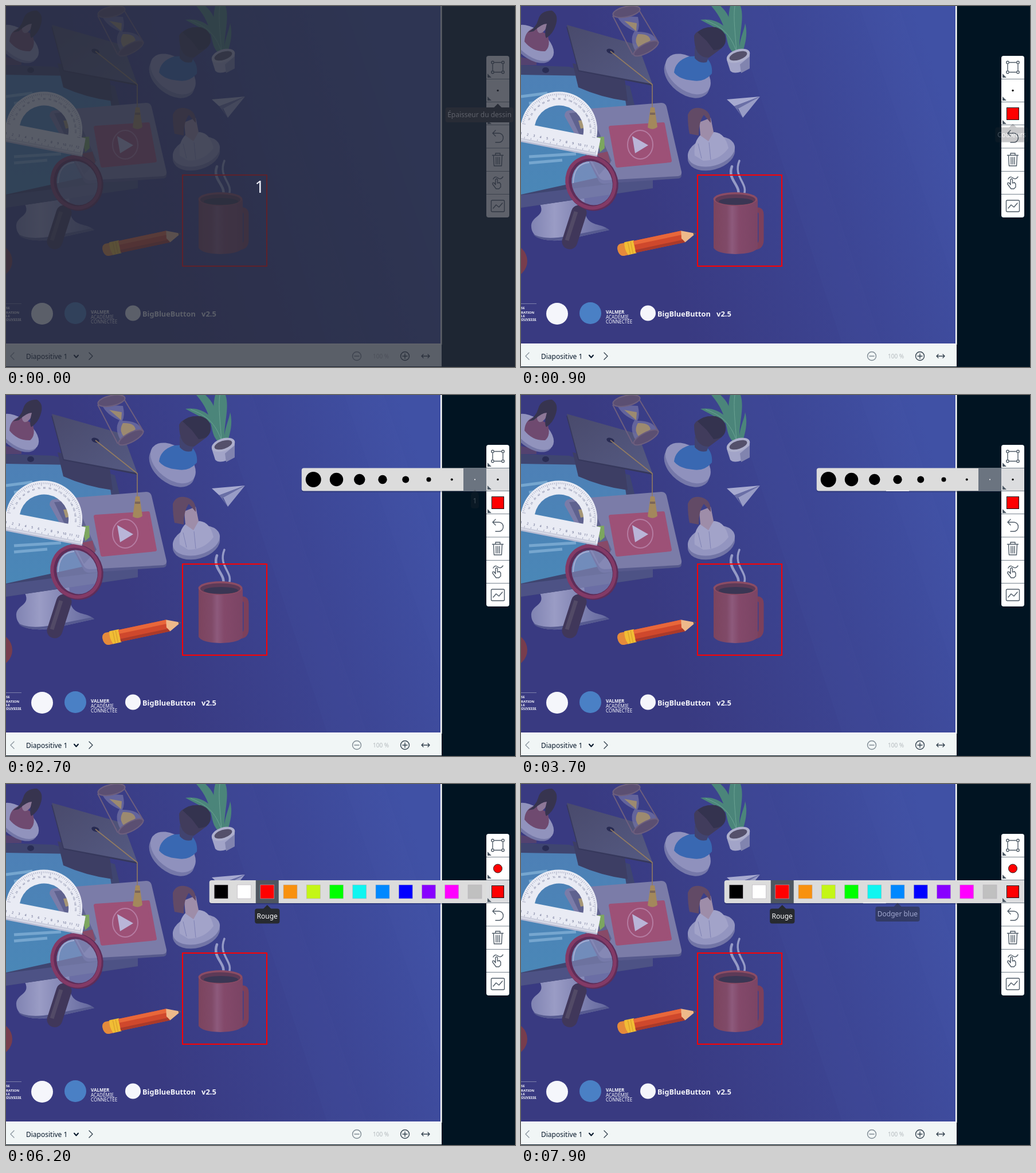
Recreate the animation shown at these times as an HTML page. Size 888 px wide and 630 px high, loop 8000 ms.

```html
<!DOCTYPE html>
<html lang="fr">
<head>
<meta charset="utf-8">
<title>Barre d'outils</title>
<style>
html, body { margin: 0; width: 100%; height: 100%; overflow: hidden; background: #011422; }
svg { display: block; width: 888px; height: 630px; font-family: "Noto Sans", "Open Sans", sans-serif; font-size: 12px; }
.icon { fill: none; stroke: #4e5a66; stroke-width: 1.4; stroke-linecap: round; stroke-linejoin: round; }
.tip text { fill: #fff; text-anchor: middle; }
</style>
</head>
<body>
<svg viewBox="0 0 888 630">
  <defs>
    <linearGradient id="sky" gradientUnits="userSpaceOnUse" x1="230" y1="400" x2="760" y2="225">
      <stop offset="0" stop-color="#393a81"/><stop offset=".5" stop-color="#3c4492"/><stop offset="1" stop-color="#4051a5"/>
    </linearGradient>
    <linearGradient id="mug">
      <stop offset="0" stop-color="#7c445e"/><stop offset=".3" stop-color="#804a68"/><stop offset=".42" stop-color="#8d5a7c"/>
      <stop offset=".58" stop-color="#83496a"/><stop offset="1" stop-color="#7b4464"/>
    </linearGradient>
    <linearGradient id="cap" x2="1" y2="1">
      <stop offset="0" stop-color="#494a6c"/><stop offset="1" stop-color="#555a82"/>
    </linearGradient>
    <linearGradient id="foot">
      <stop offset="0" stop-color="#8083b2"/><stop offset=".3" stop-color="#9a9cc5"/><stop offset="1" stop-color="#62669c"/>
    </linearGradient>
    <linearGradient id="screen" x2="0" y2="1">
      <stop offset="0" stop-color="#4d80b6"/><stop offset="1" stop-color="#4a87b7"/>
    </linearGradient>
    <clipPath id="slide"><path d="M0 0H758V589H0Z"/></clipPath>
  </defs>

  <path fill="#fff" d="M0 0H760.5V591H0Z"/>
  <g clip-path="url(#slide)">
    <path fill="url(#sky)" d="M0 0H758V590H0Z"/>
    <path fill="#5264b5" opacity=".05" d="M430 0L630 590H560L365 0ZM590 0H660L758 290V490Z"/>

    <!-- monitor -->
    <path fill="url(#foot)" d="M33 346C44 368 16 366 18 386C20 412 58 411 82 407L154 391C140 378 118 386 112 362L110 330Z"/>
    <path fill="#565a90" d="M21 398C30 411 60 410 82 407L154 391L150 388L80 402C54 406 36 406 21 398Z"/>
    <path fill="#3f4570" d="M0 103L84 106L190 140L230 303V318L0 352Z"/>
    <path fill="#4d5285" d="M0 330L230 301V318L0 352Z"/>
    <path fill="url(#screen)" d="M0 120L176 123L200 285L0 329Z"/>
    <ellipse cx="43" cy="112" rx="6" ry="5" fill="#292d55"/>
    <g stroke="#76a6cf" stroke-width="5">
      <path d="M0 158L46 152M14 170L40 166M14 263L96 258M14 274L72 269"/>
    </g>
    <path fill="#54426f" d="M0 89L27 95V103H0Z"/>

    <!-- video tablet -->
    <path fill="#56598c" d="M80 196L136 306Q140 311 148 310L275 301Q281 300 280 292L276 280Z"/>
    <path fill="#7b7ca8" d="M84 182L245 169Q252 169 254 176L280 289Q281 296 274 297L146 304Q138 304 135 297L76 192Q76 183 84 182Z"/>
    <path fill="#5f628f" d="M84 187L120 184L158 270L136 295Z"/>
    <path fill="#7ca65f" d="M133 229L145 228L146 248L138 255Z"/>
    <path fill="#a69675" d="M100 200L120 198L126 210L104 214Z"/>
    <path fill="#884a68" d="M132 258L151 254L156 274L145 276Z"/>
    <path fill="#9d5177" stroke="#9d5177" stroke-width="6" stroke-linejoin="round" d="M156 212L248 206L260 270L168 279Z"/>
    <ellipse cx="208" cy="242" rx="22" ry="25" fill="none" stroke="#b57ca2" stroke-width="2"/>
    <path fill="#b9b5d8" d="M194 227L222 243L199 257Z"/>

    <!-- graduation cap -->
    <path fill="#3d3e64" d="M90 100L100 142Q140 160 186 166L180 120Z"/>
    <path fill="#36385c" d="M79 36L100 114L229 139V135Z"/>
    <path fill="url(#cap)" d="M80 33L204 68L229 136L101 112Z"/>
    <ellipse cx="156" cy="79" rx="7" ry="4" fill="#282b52" transform="rotate(18 156 79)"/>
    <path fill="none" stroke="#927b61" stroke-width="1.6" d="M156 79L229 137V180"/>
    <path fill="#a3885c" d="M226 177H233L238 211Q230 218 221 212Z"/>
    <path fill="#7c6659" d="M225 186H234V190H225Z"/>

    <!-- hourglass -->
    <path fill="#7676a6" opacity=".7" d="M167 17L204 19Q208 36 203 45Q232 45 237 61L203 84Q187 60 198 44Q176 35 167 17Z"/>
    <path fill="#9c8a70" d="M180 26L202 30L201 44ZM204 49Q224 48 226 60L206 73Q196 62 204 49Z"/>
    <g fill="#5b4f72" stroke="#6d5f7e" stroke-width="2">
      <ellipse cx="184" cy="10" rx="24" ry="9" transform="rotate(-12 184 10)"/>
      <ellipse cx="218" cy="74" rx="24" ry="8" transform="rotate(-28 218 74)"/>
      <path fill="none" d="M160 17L195 85M207 9L240 64"/>
    </g>

    <!-- plant -->
    <g fill="#4b857a">
      <path d="M371 82C352 66 367 40 332 0H348C374 23 368 55 375 80Z"/>
      <path d="M376 85C375 50 344 42 313 24C336 21 366 30 379 78Z"/>
      <path d="M374 80C361 46 360 20 365 0H383C391 24 378 55 382 80Z"/>
      <path d="M380 84C381 55 389 46 391 30C397 53 389 70 386 86Z"/>
    </g>
    <path stroke="#6ba394" fill="none" d="M376 80C374 50 370 20 373 0M376 80C365 48 350 36 322 25"/>
    <path fill="#a2a4c8" d="M359 94L365 113Q373 122 399 108V80Z"/>
    <path fill="#8184af" d="M382 102L399 88V109L384 117Z"/>
    <ellipse cx="379" cy="87" rx="21" ry="11" fill="#aeb0cd" transform="rotate(-18 379 87)"/>
    <ellipse cx="379" cy="87" rx="16" ry="7" fill="#54506b" transform="rotate(-18 379 87)"/>

    <!-- people on discs -->
    <g transform="rotate(38 22 65)">
      <ellipse cx="21" cy="69" rx="42" ry="24" fill="#7376a6"/>
      <ellipse cx="21" cy="65" rx="42" ry="23" fill="#9193bd"/>
    </g>
    <path fill="#6f4a70" d="M6 62Q7 42 25 38L46 50Q53 70 42 79Q20 80 6 62Z"/>
    <ellipse cx="37" cy="34" rx="8" ry="14" fill="#8d7898" transform="rotate(22 37 34)"/>
    <path fill="#37344f" d="M30 24Q34 8 54 8Q67 16 60 35Q56 48 44 56Q40 50 45 31Q36 31 22 44L12 46Q26 38 30 24Z"/>
    <g transform="rotate(38 291 121)">
      <ellipse cx="292" cy="125" rx="45" ry="29" fill="#7578a9"/>
      <ellipse cx="290" cy="119" rx="45" ry="28" fill="#8f91bd"/>
    </g>
    <path fill="#3968b2" d="M267 116Q269 96 293 88L320 87Q335 99 333 118Q319 134 299 130Q276 128 267 116Z"/>
    <path fill="#41436f" d="M303 72L331 80L324 98Q311 101 303 91Z"/>
    <path fill="#413c5c" d="M302 52Q307 40 328 40L351 73L328 90Q302 91 302 52Z"/>
    <path fill="#34334f" d="M308 46Q318 35 340 37Q359 43 357 62Q354 76 336 77L324 61Z"/>
    <ellipse cx="332" cy="260" rx="42" ry="26" fill="#7275a6" transform="rotate(-15 332 260)"/>
    <ellipse cx="332" cy="254" rx="42" ry="25" fill="#9395c0" transform="rotate(-15 332 254)"/>
    <path fill="#a2a3c9" d="M303 261Q300 234 317 222L338 220Q356 222 362 248Q346 270 318 270Z"/>
    <path fill="#9e8da9" d="M311 203L331 195L336 220L327 236L313 226Z"/>
    <path fill="#624a66" d="M291 190Q297 174 316 179Q332 184 331 204L319 190Q310 202 310 226L294 223Q291 210 291 190Z"/>
    <path fill="none" stroke="#7f82b5" d="M328 238L331 268M309 240L315 266"/>

    <path fill="#a7aad0" d="M359 163L417 158L372 175Z"/>
    <path fill="#6a6fa6" d="M372 175L417 158L378 180L387 195Z"/>
    <path fill="#989cc6" d="M379 179L417 158L387 195Z"/>

    <!-- magnifier -->
    <path stroke="#40375a" stroke-width="27" stroke-linecap="round" d="M101 361L85 411"/>
    <path stroke="#524a66" stroke-width="7" d="M96 359L80 409"/>
    <ellipse cx="124" cy="309" rx="40" ry="44" fill="#8c91be" fill-opacity=".6" stroke="#5e2d59" stroke-width="10" transform="rotate(-24 124 309)"/>
    <ellipse cx="122" cy="308" rx="41" ry="45" fill="none" stroke="#833a66" stroke-width="6" transform="rotate(-24 122 308)"/>
    <path fill="none" stroke="#a5acd3" stroke-width="2" d="M91 309Q92 275 119 273"/>

    <g id="protractor" transform="translate(66 217.5) rotate(11)">
      <path fill="#babdd4" d="M-72 3V32H74V3Z"/>
      <path fill="#e9ebf4" fill-rule="evenodd" d="M-74 29V-1H-67A67 67 0 0 1 67-1H74V29ZM-43-1H43A43 43 0 0 0-43-1Z"/>
    </g>

    <!-- mug -->
    <g fill="none" stroke="#959ac6" stroke-linecap="round">
      <path stroke-width="4.5" d="M378 334C386 312 359 305 368 280"/>
      <path stroke-width="3.5" d="M388 331C399 310 369 300 381 270"/>
    </g>
    <path fill="none" stroke="#7c405b" stroke-width="9" d="M406 356H413Q419 356 419 364V408Q419 420 408 421"/>
    <path fill="url(#mug)" d="M336 338V422Q341 432 374 433Q408 432 413 422V338Z"/>
    <ellipse cx="374" cy="337" rx="38.5" ry="12" fill="#8b4c64"/>
    <ellipse cx="374" cy="338" rx="35" ry="9.5" fill="#5d3a57"/>
    <ellipse cx="375" cy="341" rx="30" ry="6" fill="#3a3654"/>
    <circle cx="-18" cy="445" r="29" fill="#773d4d"/>

    <!-- pencil -->
    <g transform="translate(169 427) rotate(-12)">
      <path fill="#e58a3b" d="M16-11H6Q-2-9 0 2Q2 11 9 11H18Z"/>
      <path fill="#f1bd35" d="M14-12H31V11H16Q11 0 14-12Z"/>
      <path stroke="#d39a2c" d="M20-11V11M25-11V11"/>
      <path fill="#cf482c" d="M30-11H115L118 10H30Z"/>
      <path fill="#e8673a" d="M30-11H115V-4H30Z"/>
      <path fill="#aa3a2a" d="M30 5H117V10H30Z"/>
      <path fill="#eeb98a" d="M115-11L139-1L118 10L113 2Z"/>
      <path fill="#5a4450" d="M135-3L139-1L135 1Z"/>
    </g>

    <!-- partners -->
    <g fill="#f5f6fb">
      <path stroke="#7d80ab" d="M0 519.5H27M0 549.5H27"/>
      <g font-size="6" font-weight="600">
        <text x="0" y="529">SE</text><text x="0" y="537">RATION</text><text x="0" y="543">LE</text><text x="0" y="549">OUVESSE</text>
      </g>
      <circle cx="63" cy="537" r="19"/>
      <circle cx="121" cy="536" r="19" fill="#4a80c5"/>
      <g font-size="8">
        <text x="148" y="537" font-weight="700">VALMER</text><text x="148" y="546">ACADÉMIE</text><text x="148" y="554">CONNECTÉE</text>
      </g>
      <circle cx="221.5" cy="536" r="13.5"/>
      <g font-weight="700">
        <text x="238" y="542" font-size="12.7">BigBlueButton</text>
        <text x="341" y="542" font-size="13" font-weight="600">v2.5</text>
      </g>
    </g>
    <path fill="none" stroke="#f00" stroke-width="2" d="M308 295H455V454H308Z"/>
  </g>

  <!-- slide controls -->
  <path fill="#f1f6f6" d="M0 591H760V629H0Z"/>
  <text x="35" y="615.5" fill="#06172a">Diapositive 1</text>
  <text x="640" y="614.5" font-size="10" fill="#b4babe">100 %</text>
  <g class="icon">
    <path stroke="#8b969f" d="M14 605L8 611L14 617"/>
    <path stroke="#06172a" style="stroke-width:2" d="M119 609.5L122.5 613.5L126 609.5"/>
    <path stroke="#34424f" d="M145 605L151 611L145 617"/>
    <path stroke="#7f8b94" d="M608 611H616M619.5 611A7.5 7.5 0 1 1 604.5 611A7.5 7.5 0 1 1 619.5 611"/>
    <path stroke="#34424f" d="M692 611H700M696 607V615M703.5 611A7.5 7.5 0 1 1 688.5 611A7.5 7.5 0 1 1 703.5 611M725 611H739M728 608L725 611L728 614M736 608L739 611L736 614"/>
  </g>

  <!-- tools -->
  <rect x="838" y="87" width="40" height="282" rx="4" fill="#fff"/>
  <path id="active" fill="#dcdddf"/>
  <path stroke="#77828d" d="M838 127.5H878M838 167.5H878M838 207.5H878M838 248H878M838 288.5H878M838 328.5H878"/>
  <path fill="#4e5a66" d="M840 118V125H847ZM840 158V165H847ZM840 199V206H847Z"/>
  <g class="icon">
    <path d="M852.5 98.5H863.5M852.5 115.5H863.5M849 102V112M867 102V112"/>
    <g id="handles"></g>
    <path d="M854 217L849 222L854 227M849 222H860A7.5 8 0 0 1 860 238H854"/>
    <path d="M848.5 260.5H867.5M854 260V257H862V260M850.5 261L851.5 279H864.5L865.5 261M855 264V276M858 264V276M861 264V276"/>
    <path d="M855 319L849 311Q848 307 852 309L854 312V303Q856 300 857.5 303V309L861 308L863 311V316L860 319ZM850 302Q853 296 858 300T867 298"/>
    <rect x="846.5" y="339" width="23" height="20" rx="2"/>
    <path d="M850 353L855 347L860 351L866 344"/>
  </g>
  <circle id="dot" cx="858" cy="147.5"/>
  <rect x="847.5" y="177.5" width="21" height="21" fill="#f00" stroke="#181418"/>

  <g id="sizes"></g>
  <g id="colors"></g>
  <path id="hover" stroke="#f7f7f7" stroke-width="1.6"/>
  <g id="tips"></g>

  <g id="veil">
    <path fill="#292d39" fill-opacity=".75" d="M0 0H888V630H0Z"/>
    <text x="442.5" y="326" font-size="29" fill="#eef0fa" text-anchor="middle">1</text>
  </g>
</svg>
<script>
const $ = id => document.getElementById(id);
const LOOP = 8000, CELL = 40.25, LAST = 818;

function add(parent, tag, attrs, text) {
  const el = document.createElementNS('http://www.w3.org/2000/svg', tag);
  for (const k in attrs) el.setAttribute(k, attrs[k]);
  if (text) el.textContent = text;
  return parent.appendChild(el);
}
const show = (el, on) => el.setAttribute('visibility', on ? 'visible' : 'hidden');
const ramp = (t, a, b) => Math.min(1, Math.max(0, (t - a) / (b - a)));
// Item positions count leftwards from the toolbar.
const itemX = i => LAST - i * CELL;

for (const x of [849, 867])
  for (const y of [98.5, 115.5]) add($('handles'), 'circle', { cx: x, cy: y, r: 2.2 });

function drawProtractor() {
  const g = $('protractor'), ink = { stroke: '#8186a5', 'stroke-width': .6 };
  for (let i = 0; i <= 60; i++) {
    const len = i % 5 ? 3 : 6;
    add(g, 'path', { ...ink, d: `M${i * 2.3 - 68} 28v${-len}` });
    add(g, 'path', { ...ink, d: `M-65 0h${len}`, transform: `rotate(${i * 3})` });
  }
  const label = { 'font-size': 5.5, fill: '#555b80', 'text-anchor': 'middle' };
  for (let n = 1; n <= 12; n++) add(g, 'text', { ...label, x: n * 11.5 - 75, y: 19 }, n);
  for (let n = 1; n < 18; n++)
    add(g, 'text', { ...label, 'font-size': 4, y: -54, transform: `rotate(${n * 10 - 90})` }, n * 10);
}

function menu(g, count, y, selected, shade) {
  const left = itemX(count - 1) - 20.5;
  add(g, 'rect', { x: left, y: y + 1, width: 838 - left, height: 41, rx: 4, fill: '#10183c', opacity: .3 });
  add(g, 'path', { fill: '#dcdcdc', d: `M838 ${y}V${y + 40}H${left + 4}q-4 0-4-4V${y + 4}q0-4 4-4Z` });
  add(g, 'rect', { x: itemX(selected) - 20, y, width: 40, height: 40, fill: shade });
}

function drawMenus() {
  menu($('sizes'), 8, 127.5, 0, '#6b7480');
  [1, 2, 4, 6, 7.7, 9.7, 11.7, 13.5].forEach((r, i) =>
    add($('sizes'), 'circle', { cx: itemX(i), cy: 147.5, r, fill: i ? '#000' : '#fff' }));
  menu($('colors'), 12, 168, 9, '#4e5661');
  const shades = ['#c0c0c0', '#f0f', '#80f', '#00f', '#08f', '#0ff5f0', '#0f0', '#c4f616', '#f8910f', '#f00', '#fff', '#000'];
  shades.forEach((fill, i) => add($('colors'), 'rect', {
    x: itemX(i) - 12, y: 176, width: 24, height: 24, fill, stroke: '#b5b0b8', 'stroke-width': .6 }));
}

function tip(label, x, edge, textX = x) {
  const g = add($('tips'), 'g', { class: 'tip' });
  const box = add(g, 'rect', { y: edge + 9.5, height: 26, rx: 4, fill: '#272a2f' });
  add(g, 'path', { d: `M${x - 7} ${edge + 10}L${x} ${edge + 3}L${x + 7} ${edge + 10}Z`, fill: '#272a2f' });
  const width = add(g, 'text', { x: textX, y: edge + 26.5 }, label).getComputedTextLength() + 7;
  box.setAttribute('x', textX - width / 2);
  box.setAttribute('width', width);
  return level => {
    g.setAttribute('opacity', level);
    g.setAttribute('transform', `translate(0 ${-7 * (1 - level)})`);
  };
}

drawProtractor();
drawMenus();

// Each tip: setter, then spans of fade-in start, end and fade-out start, end.
const tips = [
  [tip('Épaisseur du dessin', 858, 167.5, 826), [-300, 0, 400, 700]],
  [tip('Couleurs', 858, 207.5, 856), [800, 1200, 2080, 2400], [5500, 5750, 5700, 6000]],
  [tip('1', LAST, 167.5), [2600, 3000, 3300, 3600]],
  [tip('8', itemX(4), 167.5), [3900, 4300, 4400, 4700]],
  [tip('Rouge', itemX(9), 208), [5800, 6200, 9000, 9100]],
  [tip('Magenta', itemX(1), 208), [6600, 6900, 6700, 6850]],
  [tip('Dodger blue', itemX(4), 208), [7050, 7400, 7750, 8050]]
];

// Start time and item under the pointer; -1 clears it.
const hovers = [[3400, 1], [3500, 2], [3600, 3], [3700, 4], [4600, -1],
  [6400, 0], [6500, 1], [6700, 2], [6800, 3], [7000, 4], [7800, 5]];

function render(time) {
  const t = Math.floor(time / 100) * 100;
  const sizesOpen = t >= 2500 && t < 4600, colorsOpen = t >= 5700, thick = t >= 4600;
  show($('veil'), t < 100);
  show($('sizes'), sizesOpen);
  show($('colors'), colorsOpen);
  const top = colorsOpen ? 168 : 128;
  show($('active'), sizesOpen || colorsOpen);
  $('active').setAttribute('d', `M838 ${top}h40v39.5h-40Z`);
  $('dot').setAttribute('r', thick ? 7.5 : 1.7);
  $('dot').setAttribute('fill', thick ? '#f00' : '#000');
  $('dot').setAttribute('stroke', thick ? '#222' : 'none');

  const current = hovers.filter(h => h[0] <= t).pop();
  const on = current && current[1] >= 0;
  show($('hover'), on);
  if (on) $('hover').setAttribute('d', `M${itemX(current[1]) - 20} ${colorsOpen ? 207.5 : 167}h40`);

  for (const [set, ...spans] of tips)
    set(Math.max(...spans.map(([a, b, c, d]) => Math.min(ramp(t, a, b), 1 - ramp(t, c, d)))));
}

const start = performance.now();
function frame() {
  render((performance.now() - start) % LOOP);
  requestAnimationFrame(frame);
}
frame();
</script>
</body>
</html>
```
